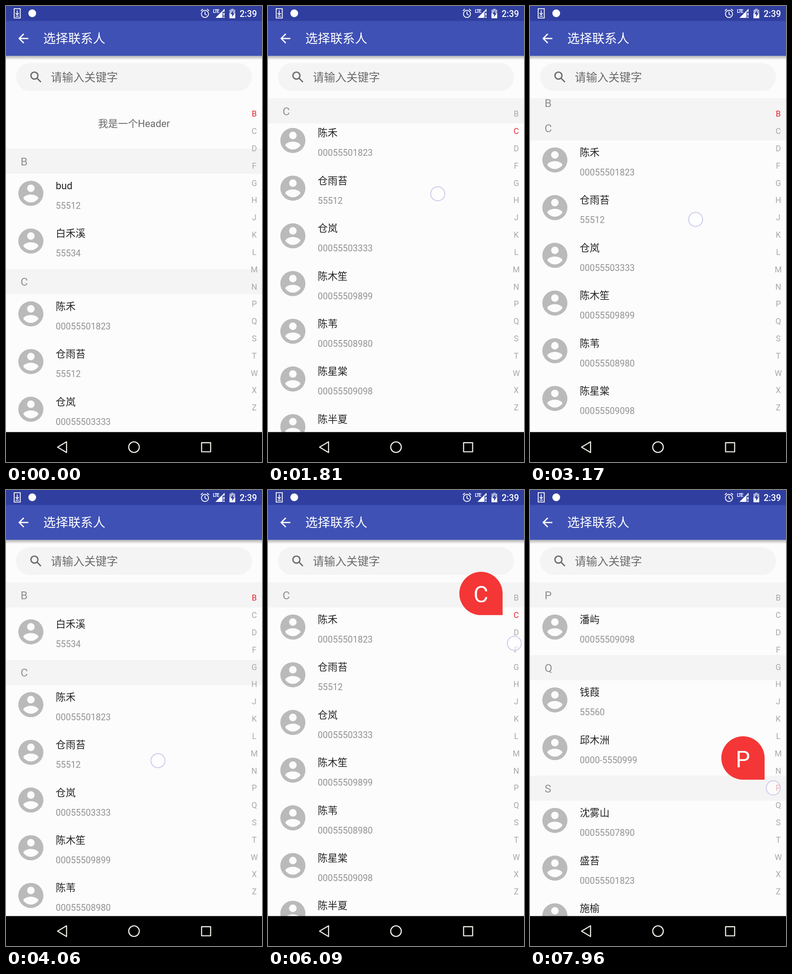
An HTML page for the animation above (8000 ms loop, 561 px wide and 998 px high).

```html
<!DOCTYPE html>
<html lang="zh-CN">
<head>
<meta charset="utf-8">
<style>
  html, body { margin: 0; width: 100%; height: 100%; overflow: hidden; background: #fcfcfc; }
  svg { display: block; width: 561px; height: 998px; }
  text { font-family: Roboto, "Noto Sans CJK SC", "Noto Sans CJK", sans-serif; }
  .name { font-size: 21.8px; fill: #242424; }
  .phone { font-size: 19.5px; fill: #939393; }
  .letter { font-size: 24.5px; fill: #8f8f8f; }
  .index { font-size: 17.7px; fill: #a8a8a8; text-anchor: middle; }
  .index.on { fill: #e02c34; }
</style>
</head>
<body>
<svg viewBox="0 0 561 998">
  <defs>
    <clipPath id="view"><rect y="202" width="561" height="731"/></clipPath>
    <linearGradient id="shade" x2="0" y2="1">
      <stop stop-opacity=".3"/><stop offset="1" stop-opacity="0"/>
    </linearGradient>
    <path id="avatar" fill="#bababa" transform="translate(21.5 -33) scale(2.75)" d="M12 2a10 10 0 1 0 0 20a10 10 0 1 0 0-20zm0 3a3 3 0 0 1 0 6a3 3 0 0 1 0-6zm0 14.2c-2.5 0-4.7-1.3-6-3.2c0-2 4-3.1 6-3.1s6 1.1 6 3.1c-1.3 1.9-3.5 3.2-6 3.2z"/>
  </defs>

  <g clip-path="url(#view)">
    <g id="list"></g>
    <g id="sticky"><rect width="561" height="55" fill="#f4f4f4"/><text class="letter" x="32" y="36.6"></text></g>
  </g>

  <rect x="22" y="125" width="517" height="61" rx="30.5" fill="#f4f4f4"/>
  <g fill="none" stroke="#6c6c6c" stroke-width="2.9">
    <circle cx="62.3" cy="152.3" r="7.7"/><path d="M67.8 157.8L76.5 166.5"/>
  </g>
  <text x="98.3" y="165" font-size="24.5" fill="#6a6a6a">请输入关键字</text>

  <rect y="109" width="561" height="9" fill="url(#shade)"/>
  <rect width="561" height="109" fill="#3f51b5"/>
  <rect width="561" height="32.7" fill="#303f9f"/>
  <path transform="translate(21.5 54.5) scale(1.375)" fill="#fff" d="M20 11H7.83l5.59-5.59L12 4l-8 8 8 8 1.41-1.41L7.83 13H20z"/>
  <text x="81.8" y="81.3" font-size="27.2" fill="#fff">选择联系人</text>

  <g fill="none" stroke="#fff" stroke-width="1.8">
    <path d="M17.9 5.9h13.4v20.4H17.9zM24.6 9.5v9M21 15.5l3.6 3.8 3.6-3.8M21 22.3h7.2"/>
    <circle cx="436" cy="17.3" r="7.8"/><path d="M436 12.5v5.2l3.8 2.4M427 10.5l4.5-3.9M445 10.5l-4.5-3.9"/>
  </g>
  <g fill="#fff">
    <circle cx="57.5" cy="16" r="8.5"/>
    <text x="453.5" y="15" font-size="10" font-weight="700" letter-spacing="-1">LTE</text>
    <path d="M459 26L479 6v6.5h-4.5V26zM476.3 15h2.5v6h-2.5zM476.3 23h2.5v3h-2.5z"/>
    <path d="M493.5 6h5v2h3.7v18.8h-12.4V8h3.7z" opacity=".6"/>
    <path d="M489.8 16h12.4v10.8h-12.4z"/>
    <text x="511.9" y="23.6" font-size="19.3" font-weight="500">2:39</text>
  </g>
  <path d="M497.5 10l-5.5 8h3.5v6l5.2-8h-3.2z" fill="#303f9f"/>

  <g id="index"></g>
  <g id="bubble">
    <path d="M47.5 47.3H0A47.4 47.4 0 1 1 47.5 0z" fill="#f43636"/>
    <text y="19.9" font-size="50" fill="#fff" text-anchor="middle"></text>
  </g>

  <rect y="932.5" width="561" height="66"/>
  <g fill="none" stroke="#eeeee6" stroke-width="2.4" stroke-linejoin="round">
    <path d="M113 965.5L132.7 953.8V977.2zM428.6 955.8h19.8v19.8h-19.8z"/><circle cx="280.5" cy="965.5" r="11.6"/>
  </g>
  <circle id="touch" r="15.4" fill="#fff" fill-opacity=".6" stroke="#cbcbee" stroke-width="2"/>
</svg>
<script>
const LOOP = 8000, TOP = 202, ROW = 104.4, HEAD = 55, STEP = 37.82;
const LETTERS = [...'BCDFGHJKLMNPQSTWXZ'];
const PHONES = ['55512', '55534', '00055501823', '00055503333', '00055509899', '00055508980',
  '00055509098', '55560', '0000-5550999', '00055507890'];
// Each entry is a name followed by the position of its number in PHONES.
const SECTIONS = `B bud0 白禾溪1|C 陈禾2 仓雨苔0 仓岚3 陈木笙4 陈苇5 陈星棠6 陈半夏7 崔砚8
D 丁屿9 杜青蘅2|F 方汐1 冯竹溪3|G 高苇舟4 顾苔5 葛云蓼6|H 何榆7 胡星穗8 黄澍9|J 江木棠2 姜芷1
K 孔砚秋3 康葭4|L 李青穗7 乐汐7 李云桐8 李澍9 李禾雾2 刘芷1 刘砚溪3 林苔4
M 马屿5 孟竹笙6|N 倪星苇7 宁榆8|P 潘屿6|Q 钱葭7 邱木洲8|S 沈雾山9 盛苔2 施榆1 宋青蓼3`
  .split(/[|\n]/).map(line => line.trim().split(' '));

const $ = id => document.getElementById(id);
const list = $('list'), sticky = $('sticky'), bubble = $('bubble'), touch = $('touch');
const move = (el, x, y) => el.setAttribute('transform', `translate(${x} ${y})`);
const show = (el, on) => el.style.display = on ? '' : 'none';

let y = 110;
let rows = '<text class="name" x="280.5" y="63.3" text-anchor="middle" style="fill:#686868">我是一个Header</text>';
const tops = SECTIONS.map(([letter, ...people]) => {
  const top = y;
  rows += `<rect y="${y}" width="561" height="${HEAD}" fill="#f4f4f4"/><text class="letter" x="32" y="${y + 36.6}">${letter}</text>`;
  y += HEAD;
  for (const person of people) {
    rows += `<g transform="translate(0 ${y + 43})"><use href="#avatar"/>
      <text class="name" x="109" y="-9">${person.slice(0, -1)}</text>
      <text class="phone" x="109" y="34">${PHONES[person.at(-1)]}</text></g>`;
    y += ROW;
  }
  return top;
});
list.innerHTML = rows;
$('index').innerHTML = LETTERS.map((c, i) =>
  `<text class="index" x="544" y="${236 + i * STEP + 6.3}">${c}</text>`).join('');
const marks = [...$('index').children];

// Monotone cubic curve through [time, value] points.
function curve(points) {
  const slope = i => points[i + 1] && points[i]
    ? (points[i + 1][1] - points[i][1]) / (points[i + 1][0] - points[i][0]) : 0;
  const tangent = i => {
    const a = slope(i - 1), b = slope(i);
    return a * b > 0 ? 2 * a * b / (a + b) : 0;
  };
  return t => {
    if (t <= points[0][0]) return points[0][1];
    const i = points.findIndex(p => p[0] > t) - 1;
    if (i < 0) return points.at(-1)[1];
    const [t0, v0] = points[i], [t1, v1] = points[i + 1];
    const d = t1 - t0, s = (t - t0) / d, r = 1 - s;
    return v0 * (1 + 2 * s) * r * r + v1 * s * s * (3 - 2 * s)
      + d * s * r * (tangent(i) * r - tangent(i + 1) * s);
  };
}
const drag = curve([[240, 0], [700, 130], [1300, 300], [1810, 379.5], [2300, 420], [3170, 337],
  [3600, 245], [4060, 204], [4250, 203], [5050, 105]]);
const dragX = curve([[240, 382], [1810, 372], [3170, 363], [4060, 333], [5050, 312]]);
const slide = curve([[5400, 238], [5700, 250], [6500, 470], [6890, 582], [7150, 625], [7600, 650], [7960, 652]]);
const slideX = curve([[5400, 541], [6890, 537], [7960, 533]]);
const HOLDS = [970, 1810, 3500, 4390, 6090, 6930, 7820];

function draw(t) {
  t = HOLDS.find(h => t > h && t < h + 100) ?? t;
  const indexing = t >= 5450, dragging = t >= 240 && t < 5120;
  const followY = slide(t - 150);
  const picked = Math.floor((followY - 236) / STEP + 0.5);
  const scroll = indexing ? tops[picked] : drag(t);

  const current = tops.findLastIndex(top => top <= scroll + 0.01);
  move(list, 0, TOP - scroll);
  show(sticky, current >= 0);
  if (current >= 0) {
    sticky.lastChild.textContent = LETTERS[current];
    move(sticky, 0, TOP + Math.min(0, (tops[current + 1] ?? 1e6) - scroll - HEAD));
  }
  marks.forEach((mark, i) => mark.classList.toggle('on', i === Math.max(0, current)));

  show(bubble, indexing);
  if (indexing) {
    bubble.querySelector('text').textContent = LETTERS[picked];
    move(bubble, 466.6, followY - 65);
  }
  show(touch, dragging || t >= 5400);
  if (dragging) move(touch, dragX(t), 796 - drag(t + 50));
  else move(touch, slideX(t), slide(t));
}

const start = performance.now();
function tick() {
  draw((performance.now() - start) % LOOP);
  requestAnimationFrame(tick);
}
tick();
</script>
</body>
</html>
```
